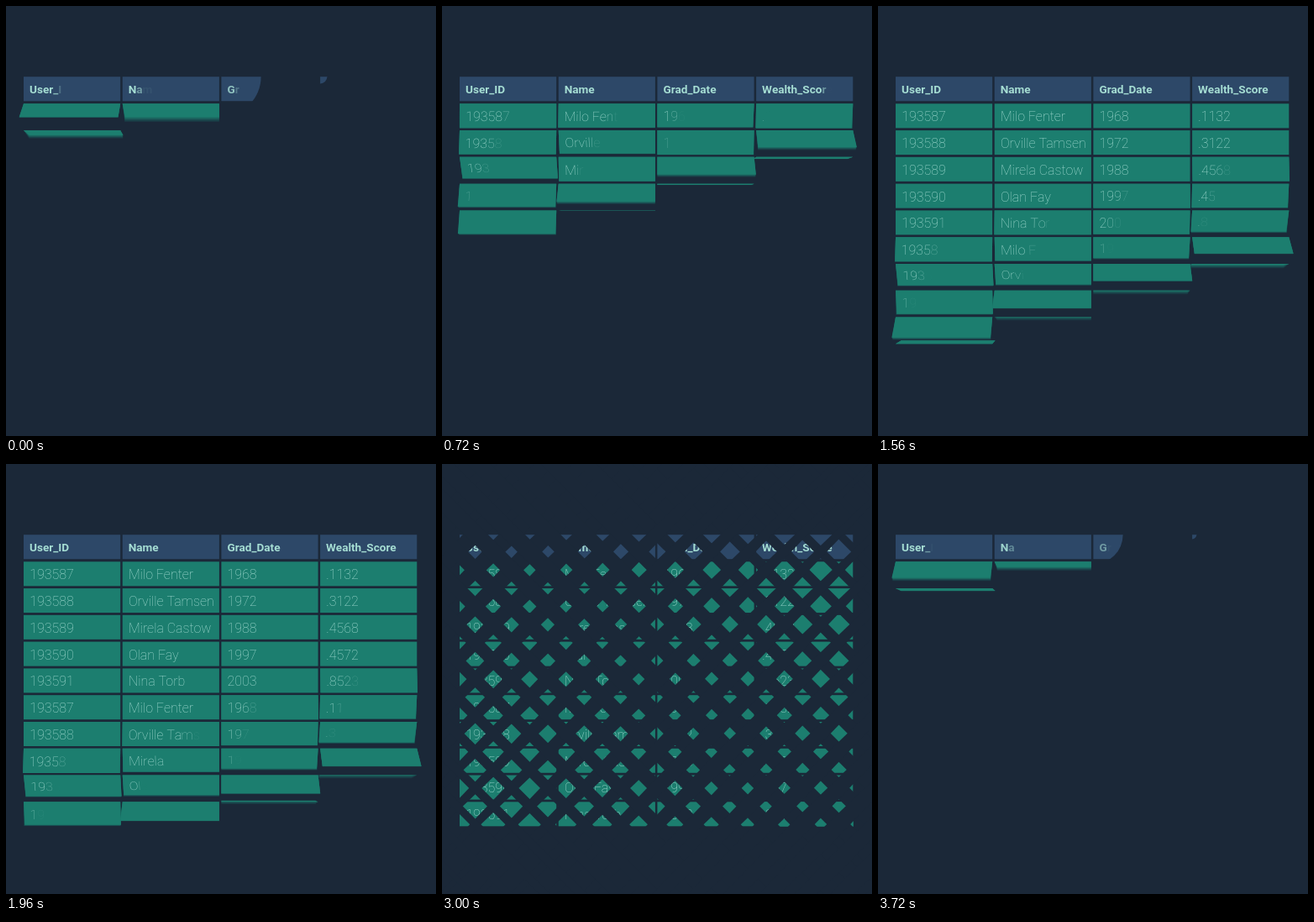
An HTML page with a canvas for the animation above (3.76 s loop, 512 px wide and 512 px high).

```html
<!DOCTYPE html>
<html lang="en">
<head>
<meta charset="utf-8">
<title>Table build</title>
<style>
  html, body { margin: 0; width: 100%; height: 100%; overflow: hidden; background: #1b2838; }
  canvas { display: block; width: 512px; height: 512px; }
</style>
</head>
<body>
<canvas id="stage" width="512" height="512"></canvas>
<script>
const ctx = document.getElementById('stage').getContext('2d');
const LOOP = 3760, CENTER = 256, DEPTH = 1000;
const BG = '#1b2838', BLUE = '#2d4868', GREEN = '#1c7e6f', INK = '#a5ddd3';
const CELL_W = 115.2, CELL_H = 29, COL_STEP = 117.7, ROW_STEP = 31.78;
const HEAD_FONT = '700 13.6px Roboto, sans-serif';
const CELL_FONT = '100 16px Roboto, sans-serif';

const heads = ['User_ID', 'Name', 'Grad_Date', 'Wealth_Score'];
const people = [
  ['193587', 'Milo Fenter', '1968', '.1132'],
  ['193588', 'Orville Tamsen', '1972', '.3122'],
  ['193589', 'Mirela Castow', '1988', '.4568'],
  ['193590', 'Olan Fay', '1997', '.4572'],
  ['193591', 'Nina Torb', '2003', '.8523']
];
const rows = people.concat(people);

// Hinge angle: [ms, degrees], eased with a sine between keys
const swing = [[0, -90], [250, 50], [500, -37], [750, 8], [1000, 0]];

const clamp = v => Math.max(0, Math.min(1, v));
const colX = c => 21 + COL_STEP * c;
const rowY = r => 116.3 + ROW_STEP * r;

function angleAt(ms) {
  if (ms <= 0) return -Math.PI / 2;
  for (let i = 1; i < swing.length; i++) {
    const [t0, a] = swing[i - 1], [t1, b] = swing[i];
    if (ms < t1) {
      const k = (1 - Math.cos(Math.PI * (ms - t0) / (t1 - t0))) / 2;
      return (a + (b - a) * k) * Math.PI / 180;
    }
  }
  return 0;
}

// Bottom edge of a hinged cell after perspective
function bottomEdge(x, y, angle) {
  const s = DEPTH / (DEPTH - CELL_H * Math.sin(angle));
  const px = v => CENTER + (v - CENTER) * s;
  return {
    left: px(x),
    right: px(x + CELL_W),
    y: CENTER + (y + CELL_H * Math.cos(angle) - CENTER) * s
  };
}

function typeText(text, x, y, font, progress) {
  ctx.font = font;
  ctx.fillStyle = INK;
  if (progress >= 1.2) {
    ctx.fillText(text, x, y);
    return;
  }
  const head = progress * (text.length + 1);
  for (let i = 0; i < text.length; i++) {
    const alpha = clamp((head - i) / 2);
    if (alpha <= 0) break;
    ctx.globalAlpha = alpha;
    ctx.fillText(text[i], x + ctx.measureText(text.slice(0, i)).width, y);
  }
  ctx.globalAlpha = 1;
}

function drawHead(c, t) {
  const age = t + 965 - 200 * c;
  if (age <= 0) return;
  const x = colX(c), y = 84.2;
  const radius = Math.min(130, 4.6e-10 * age ** 4);
  ctx.save();
  ctx.beginPath();
  ctx.arc(x, y, radius, 0, 2 * Math.PI);
  ctx.clip();
  ctx.fillStyle = BLUE;
  ctx.fillRect(x, y, CELL_W, CELL_H);
  typeText(heads[c], x + 7, y + 19.3, HEAD_FONT, (t + 524 - 200 * c) / 760);
  ctx.restore();
}

function drawCell(r, c, t) {
  const age = t + 280 - 200 * (r + c) - (c ? 0 : 40);
  if (age < 0) return;
  const x = colX(c), y = rowY(r);
  ctx.fillStyle = GREEN;
  if (age > 1000) {
    ctx.fillRect(x, y, CELL_W, CELL_H);
  } else {
    // Motion blur: largest pose first, rising alpha averages the poses
    const poses = [-10, -6, -2, 2, 6, 10]
      .map(dt => angleAt(age + dt))
      .sort((a, b) => Math.cos(b) - Math.cos(a));
    poses.forEach((angle, i) => {
      const e = bottomEdge(x, y, angle);
      ctx.globalAlpha = 1 / (poses.length - i);
      ctx.beginPath();
      ctx.moveTo(x, y);
      ctx.lineTo(x + CELL_W, y);
      ctx.lineTo(e.right, e.y);
      ctx.lineTo(e.left, e.y);
      ctx.fill();
    });
    ctx.globalAlpha = 1;
  }
  const typed = (age - 270) / 760;
  if (typed <= 0) return;
  const e = bottomEdge(x, y, angleAt(age));
  ctx.save();
  ctx.transform(1, 0, (e.left - x) / CELL_H, (e.y - y) / CELL_H, x, y);
  typeText(rows[r][c], 7.2, 20.9, CELL_FONT, typed);
  ctx.restore();
}

function drawTable(t) {
  heads.forEach((_, c) => drawHead(c, t));
  rows.forEach((row, r) => row.forEach((_, c) => drawCell(r, c, t)));
}

// Diagonal lattice that thickens outward from the main diagonal
function drawLattice(t) {
  if (t < 2300) return;
  const step = 30.6, reach = 380;
  const core = 9 + 0.03 * (t - 2600);
  const fall = Math.max(0.0001, 0.055 - 0.0000625 * (t - 2600)) * Math.SQRT2;
  const widthAt = v => Math.max(0, core - fall * Math.abs(v));
  const tip = Math.min(reach, core / fall);
  const half = core / 2, end = widthAt(tip) / 2;
  ctx.save();
  ctx.translate(CENTER, CENTER);
  ctx.rotate(Math.PI / 4);
  ctx.fillStyle = BG;
  for (let k = -12; k <= 12; k++) {
    const p = k * step, w = widthAt(p);
    if (w > 0) ctx.fillRect(-reach, p - w / 2, 2 * reach, w);
    ctx.beginPath();
    ctx.moveTo(p - end, -tip);
    ctx.lineTo(p + end, -tip);
    ctx.lineTo(p + half, 0);
    ctx.lineTo(p + end, tip);
    ctx.lineTo(p - end, tip);
    ctx.lineTo(p - half, 0);
    ctx.fill();
  }
  ctx.restore();
}

function frame() {
  const t = performance.now() % LOOP;
  ctx.fillStyle = BG;
  ctx.fillRect(0, 0, 512, 512);
  if (t < 3420) {
    drawTable(t);
    drawLattice(t);
  }
  drawTable(t - LOOP);
  requestAnimationFrame(frame);
}
frame();
</script>
</body>
</html>
```
